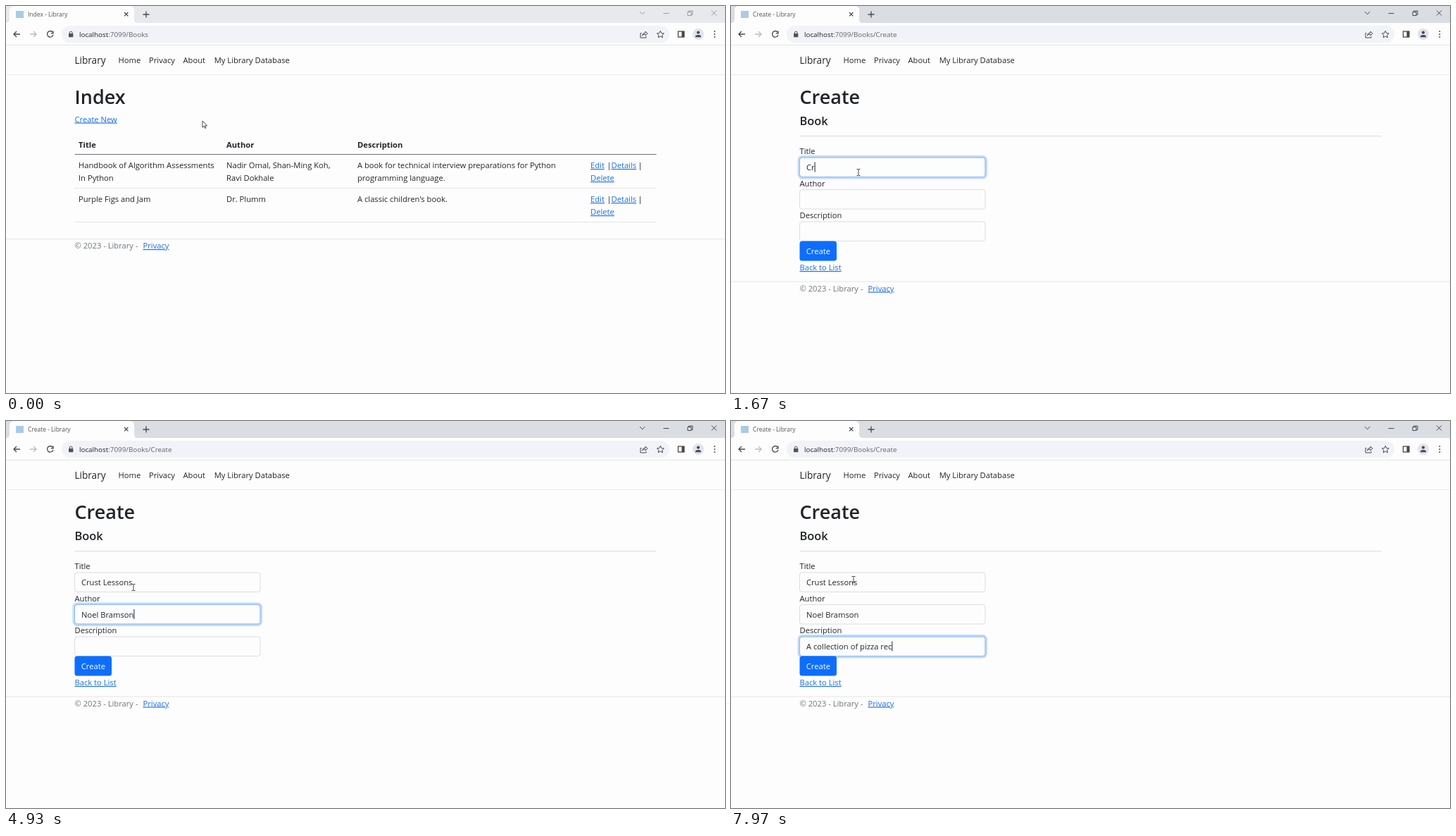
Animation of 1021 by 549 pixels, one loop 8 s. Source, as an HTML page:

```html
<!DOCTYPE html>
<html lang="en">
<head>
<meta charset="utf-8">
<title>Library</title>
<style>
html, body { margin: 0; width: 100%; height: 100%; overflow: hidden; background: #fdfdfd; }
svg { display: block; width: 1021px; height: 549px; }
text { font: 11.2px "Open Sans", "Noto Sans", sans-serif; fill: #212529; white-space: pre; }
.link { fill: #1a6fe8; text-decoration: underline; }
.h1 { font-size: 27px; font-weight: 600; }
.h4 { font-size: 16.4px; font-weight: 600; }
.th { font-weight: 700; }
.brand { font-size: 13.6px; }
.muted { fill: #6c757d; }
.white { fill: #fff; }
.tab { font-size: 8.5px; fill: #50545a; }
.url { font-size: 9.84px; fill: #5f6368; }
.host { fill: #202124; }
.status { font-size: 8.44px; fill: #85888c; }
.icon { fill: none; stroke: #45494d; stroke-width: 1.3; }
.thin { stroke-width: 1; }
</style>
</head>
<body>
<svg id="stage" viewBox="0 0 1021 549"></svg>
<script>
const text = (x, y, s, cls = '', id = '') => `<text x="${x}" y="${y}" class="${cls}" id="${id}">${s}</text>`;
const rect = (x, y, w, h, fill, more = '') => `<rect x="${x}" y="${y}" width="${w}" height="${h}" fill="${fill}" ${more}/>`;
const path = (d, cls = 'icon', more = '') => `<path d="${d}" class="${cls}" ${more}/>`;
const rule = (y, color, x = 0, w = 1021) => rect(x, y, w, 1, color);

const chrome = `
  ${rect(0, 0, 1021, 24, '#dadee3', 'id="strip"')}
  <path d="M0 24Q5 24 5 19V6Q5 0 11 0H176Q182 0 182 6V19Q182 24 187 24Z" fill="#fdfdfd"/>
  ${rect(14, 7, 11, 10, '#a9cbe6')}
  ${text(31, 14.5, '', 'tab', 'tabTitle')}
  ${path('M168 9l5.4 5.4M173.400 9L168 14.400')}
  ${path('M194.500 12h9M199 7.500v9')}
  <g id="controls">
    ${path('M900 8l3.700 3.700L907.400 8', 'icon thin')}
    ${path('M933.500 10.500h8', 'icon thin')}
    ${path('M968 8.500h5v5h-5zM969.500 8.500V7h5.500v5.500h-2', 'icon thin')}
    ${path('M1002 6.500l7 7M1009 6.500l-7 7', 'icon thin')}
  </g>
  ${path('M20 40H11M15 36l-4 4 4 4')}
  ${path('M34 40h9M39 36l4 4-4 4', 'icon', 'style="stroke:#b9bcc0"')}
  ${path('M66.300 37.200A4.300 4.300 0 1 0 67 41M67 35.500v3.300h-3.300')}
  ${rect(79, 28, 863, 24, '#f2f3f9', 'rx="12"')}
  ${rect(89, 39, 6.4, 5.2, '#505458', 'rx=".8"')}
  ${path('M90.300 39.500v-1.500a1.900 1.900 0 0 1 3.800 0v1.500', 'icon thin')}
  <text x="104" y="43.7" class="url"><tspan class="host">localhost</tspan>:7099/Books<tspan id="urlEnd"></tspan></text>
  ${path('M902.500 38.500h-1.500v6.500h8v-2M903.500 42q.5-4 4.500-4v-2l3 3-3 3v-2q-3 0-4.500 2z', 'icon thin')}
  ${path('M929.300 35.200l1.500 3.300 3.500.4-2.600 2.400.7 3.500-3.100-1.800-3.100 1.800.7-3.500-2.600-2.400 3.500-.4z', 'icon thin')}
  ${rect(954.500, 36, 8.500, 8, 'none', 'stroke="#45494d" stroke-width="1.3"')}${rect(959.500, 36, 3.500, 8, '#45494d')}
  <circle cx="983" cy="40" r="8" fill="#e2e4ec"/>
  <circle cx="983" cy="37.600" r="2.100" fill="#43485a"/>
  <path d="M978.800 44.300q0-3.300 4.200-3.300t4.200 3.300z" fill="#43485a"/>
  ${[36, 40, 44].map(y => `<circle cx="1006.300" cy="${y}" r="1" fill="#45494d"/>`).join('')}
  ${rule(55, '#e3e4e6')}`;

const nav = text(97.5, 82, 'Library', 'brand')
  + text(159.5, 81, 'Home') + text(203, 81, 'Privacy') + text(251.5, 81, 'About')
  + text(295.7, 81, 'My Library Database') + rule(97, '#ebebe6');

const footer = y => rule(y, '#e6e6e0') + text(97.5, y + 14, '© 2023 - Library - ', 'muted')
  + text(194.5, y + 14, 'Privacy', 'link');

const actions = y => text(830, y, 'Edit', 'link') + text(853.3, y, '|')
  + text(859.5, y, 'Details', 'link') + text(897.5, y, '|') + text(830, y + 18, 'Delete', 'link');

const indexPage = `<g id="index">
  ${text(97.5, 139, 'Index', 'h1')}
  ${text(97.5, 164.5, 'Create New', 'link')}
  ${text(103, 200.5, 'Title', 'th')}${text(313, 200.5, 'Author', 'th')}${text(499, 200.5, 'Description', 'th')}
  ${rule(210, '#6f7174', 97.5, 826)}
  ${text(103, 230, 'Handbook of Algorithm Assessments')}${text(103, 248, 'In Python')}
  ${text(313, 230, 'Nadir Omal, Shan-Ming Koh,')}${text(313, 248, 'Ravi Dokhale')}
  ${text(499, 230, 'A book for technical interview preparations for Python')}${text(499, 248, 'programming language.')}
  ${actions(230)}${rule(258, '#e4e5e6', 97.5, 826)}
  ${text(103, 278, 'Purple Figs and Jam')}${text(313, 278, 'Dr. Plumm')}${text(499, 278, "A classic children's book.")}
  ${actions(278)}${rule(306, '#e4e5e6', 97.5, 826)}
  ${footer(330)}</g>`;

// Form fields: key times are the focus moment, the first key and the gap between keys.
const fields = [
  { label: 'Title', y: 215, value: 'Crust Lessons', focus: 1400, start: 1560, gap: 85 },
  { label: 'Author', y: 260.5, value: 'Noel Bramson', focus: 2757, start: 3180, gap: 150 },
  { label: 'Description', y: 306, value: 'A collection of pizza rec', focus: 5300, start: 5946, gap: 84 },
];
fields.forEach((f, i) => f.blur = fields[i + 1] ? fields[i + 1].focus : Infinity);

const box = (y, color, more = '') => rect(97.5, y, 263.5, 27.5, 'none', `rx="3.500" stroke="${color}" ${more}`);
const field = (f, i) => `${text(97.5, f.y - 5, f.label)}
  ${box(f.y, '#dcdde0')}
  <g id="glow${i}">${rect(96, f.y - 1.5, 266.5, 30.5, 'none', 'rx="5" stroke="#c2dafe" stroke-width="3"')}${box(f.y, '#86b7fe')}</g>
  ${text(107, f.y + 18, '', '', 'value' + i)}`;

const createPage = `<g id="create">
  ${text(97.5, 139, 'Create', 'h1')}
  ${text(97.5, 169, 'Book', 'h4')}
  ${rule(184, '#d8d7ea', 97.5, 826)}
  ${fields.map(field).join('')}
  ${rect(0, 0, 1, 14, '#212529', 'id="caret"')}
  ${rect(97.5, 333.5, 52.5, 28, '#0d6efd', 'rx="3.500"')}
  ${text(106.8, 352, 'Create', 'white')}
  ${text(97.5, 375, 'Back to List', 'link')}
  ${footer(390.5)}</g>`;

const overlay = `<g id="status">
    <path d="M0 533H147Q150 533 150 536V549H0Z" fill="#e9ebee"/>
    ${text(2, 544.5, 'https://localhost:7099/Books/Create', 'status')}
  </g>
  <g id="arrow"><path d="M0 0V9.300L2.200 7.300 3.700 10.500 5 9.900 3.600 6.800H6.500Z" fill="#fff" stroke="#333" stroke-width=".9"/></g>
  <g id="hand"><path d="M-1 0Q0-1 1 0V4Q5 4 6 6V9L4.500 12H-1L-4 7Q-3.500 6-1 8Z" fill="#fff" stroke="#333" stroke-width=".9"/></g>
  <g id="beam"><path d="M-2.500-4.500H-.6L0-4 .6-4.500H2.500M0-4V4M-2.500 4.500H-.6L0 4 .6 4.500H2.500" fill="none" stroke="#333" stroke-width=".9"/></g>`;

document.getElementById('stage').innerHTML = chrome + nav + indexPage + createPage + overlay;

const $ = id => document.getElementById(id);
const show = (id, on) => $(id).style.display = on ? '' : 'none';
const clamp = v => Math.min(1, Math.max(0, v));
const ease = v => v * v * (3 - 2 * v);

const CLICK = 520, LOAD = 640, LOOP = 8000;
// Mouse track: time, x, y
const track = [[60, 279, 163], [400, 136, 160], [660, 136, 160], [870, 190, 212], [1180, 181, 236], [5480, 181, 236], [5700, 174, 225]];

function mouseAt(t) {
  const i = track.findIndex(p => p[0] > t);
  if (i === 0) return track[0].slice(1);
  if (i < 0) return track[track.length - 1].slice(1);
  const [a, b] = [track[i - 1], track[i]];
  const k = ease((t - a[0]) / (b[0] - a[0]));
  return [a[1] + (b[1] - a[1]) * k, a[2] + (b[2] - a[2]) * k];
}

function drawField(f, i, t) {
  const count = Math.min(f.value.length, Math.max(0, Math.floor((t - f.start) / f.gap) + 1));
  const value = $('value' + i);
  value.textContent = f.value.slice(0, count);
  $('glow' + i).style.opacity = ease(clamp((t - f.focus) / 150)) - ease(clamp((t - f.blur) / 150));
  if (t < f.focus || t >= f.blur) return;
  const lastKey = count ? f.start + (count - 1) * f.gap : f.focus;
  const caret = $('caret');
  caret.setAttribute('x', 107 + (count ? value.getComputedTextLength() : 0));
  caret.setAttribute('y', f.y + 6.5);
  show('caret', (t - lastKey) % 1000 < 500);
}

function draw(t) {
  const loaded = t >= LOAD, active = t >= CLICK;
  show('index', !loaded);
  show('create', loaded);
  $('tabTitle').textContent = (loaded ? 'Create' : 'Index') + ' - Library';
  $('urlEnd').textContent = loaded ? '/Create' : '';
  $('strip').setAttribute('fill', active ? '#dadee3' : '#e7e9ed');
  $('controls').style.opacity = active ? 1 : .5;

  show('caret', false);
  if (loaded) fields.forEach((f, i) => drawField(f, i, t));

  const [x, y] = mouseAt(t);
  const onLink = !loaded && x < 158 && y < 168;
  const onInput = loaded && y > 215;
  show('arrow', !onLink && !onInput);
  show('hand', onLink);
  show('beam', onInput);
  for (const id of ['arrow', 'hand', 'beam']) $(id).setAttribute('transform', `translate(${x} ${y})`);
  show('status', t > 360 && t < 1100);
  $('status').style.opacity = 1 - clamp((t - 900) / 200);
}

function tick() {
  draw(performance.now() % LOOP);
  requestAnimationFrame(tick);
}
tick();
</script>
</body>
</html>
```
